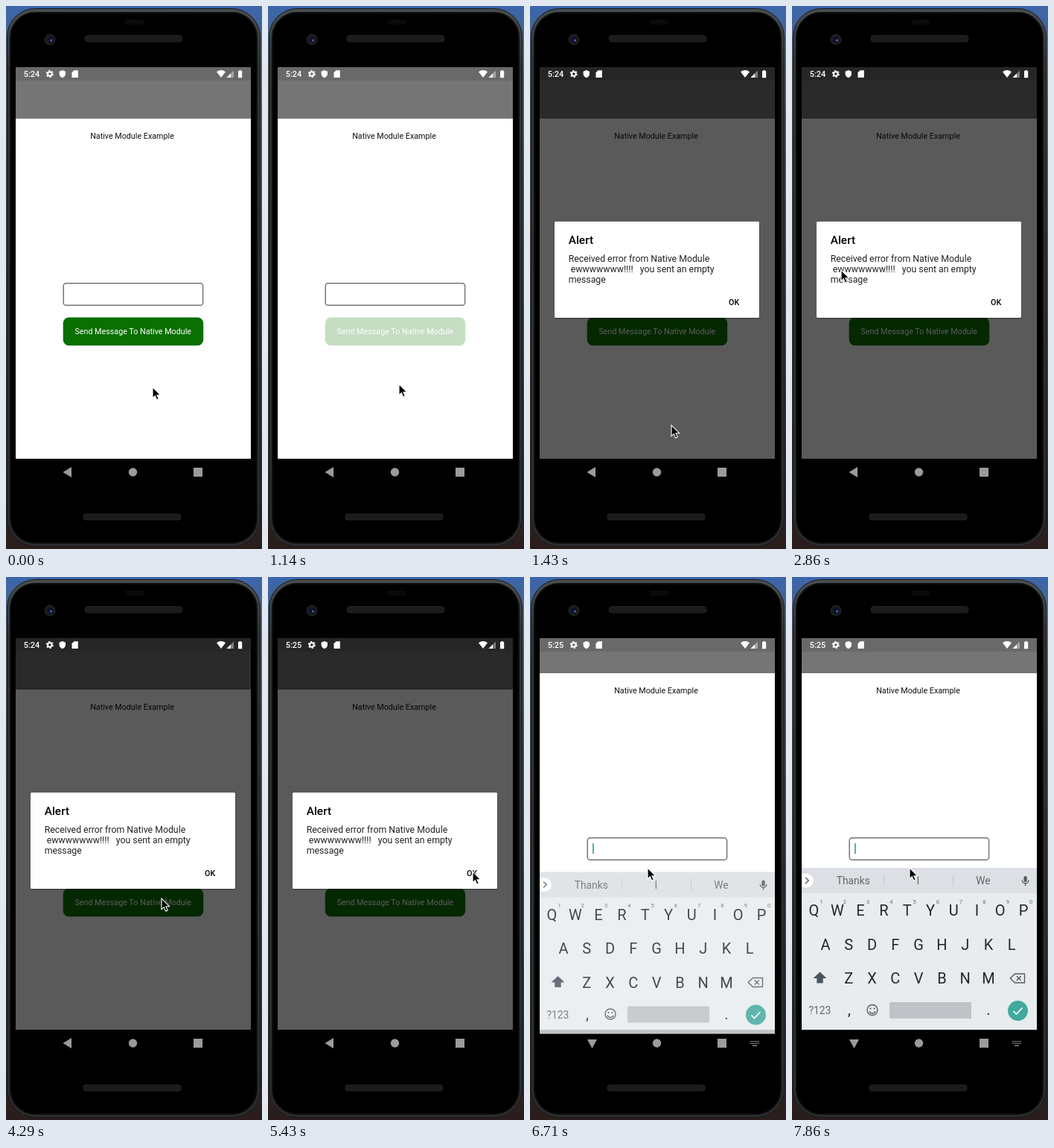
Recreate the animation shown at these times as an HTML page. Size 344 px wide and 728 px high, loop 8000 ms.

```html
<!DOCTYPE html>
<html lang="en">
<head>
<meta charset="utf-8">
<title>Native Module Example</title>
<style>
html, body { margin: 0; width: 100%; height: 100%; overflow: hidden; background: #222; }
svg { display: block; width: 100%; height: 100%; }
text { font-family: Roboto, sans-serif; font-size: 10.76px; white-space: pre; }
.mid { text-anchor: middle; }
.bold { font-weight: 500; }
.body { font-size: 12.3px; fill: #222; }
.word { font-size: 13.8px; fill: #62676c; }
.key { font-size: 20px; fill: #20282f; }
.hint { font-size: 7.5px; fill: #666c72; }
.line { fill: none; stroke: #555b61; stroke-width: 1.4; }
</style>
</head>
<body>
<svg viewBox="0 0 344 728">
  <defs>
    <linearGradient id="desk" x2="0" y2="1">
      <stop offset="0" stop-color="#3c66ac"/>
      <stop offset=".07" stop-color="#4a6288"/>
      <stop offset=".12" stop-color="#55585b"/>
      <stop offset=".7" stop-color="#353637"/>
      <stop offset="1" stop-color="#2a1d1c"/>
    </linearGradient>
    <linearGradient id="rim" x2="0" y2="1">
      <stop offset="0" stop-color="#4a4e4e"/>
      <stop offset=".1" stop-color="#303333"/>
      <stop offset="1" stop-color="#2b2d2d"/>
    </linearGradient>
    <clipPath id="view"><rect x="13" y="82" width="316" height="525"/></clipPath>
  </defs>

  <rect width="344" height="728" fill="url(#desk)"/>
  <rect x="1.5" y="3.5" width="340" height="721" rx="38" fill="url(#rim)" stroke="#161818"/>
  <rect x="6" y="9" width="331" height="711" rx="33" fill="#000" stroke="#0d0e0e" stroke-width="2"/>
  <rect x="160" y="18" width="26" height="7" rx="3" fill="#090909"/>
  <g fill="#1b1b1b" stroke="#2a2a2a" stroke-width=".8">
    <rect x="106" y="39.5" width="131" height="8.5" rx="4"/>
    <rect x="104" y="681" width="131" height="8" rx="3"/>
    <circle cx="59" cy="45" r="7"/>
  </g>
  <circle cx="59.5" cy="45" r="3.6" fill="#0b1229"/>
  <circle cx="60.5" cy="46" r="1.5" fill="#4766b4"/>

  <g clip-path="url(#view)">
    <rect id="page" x="13" y="82" width="316" height="525"/>
    <g id="content">
      <rect x="13" y="60" width="316" height="91" fill="#757575"/>
      <text class="mid" x="169.5" y="178" fill="#111">Native Module Example</text>
      <rect x="77.2" y="371.7" width="187.4" height="29.6" rx="3.6" fill="#fff" stroke="#757575" stroke-width="1.5"/>
      <rect id="caret" x="84.2" y="379" width="1.5" height="14" fill="#1b9a8c"/>
      <g id="button">
        <rect x="76.7" y="417.5" width="188.5" height="37.7" rx="7.7" fill="#0a7000"/>
        <text class="mid" x="170.7" y="440.3" fill="#fff">Send Message To Native Module</text>
      </g>
    </g>
    <rect x="13" y="82" width="316" height="18" fill="#696969"/>
    <rect id="dim" x="13" y="82" width="316" height="525"/>
  </g>

  <g fill="#fff">
    <text id="clock" class="bold" x="23.7" y="95.2" style="font-size:11px" fill="#fff"></text>
    <circle cx="58.8" cy="91" r="2.8" fill="none" stroke="#fff" stroke-width="2"/>
    <circle cx="58.8" cy="91" r="4.2" fill="none" stroke="#fff" stroke-width="1.7" stroke-dasharray="2.2"/>
    <path d="M75.8 86l4.2 1.7v3q0 3.8-4.2 5.6q-4.2-1.8-4.2-5.6v-3z"/>
    <path d="M91.5 86.2h5.3v9.8h-8.3v-6.8z"/>
    <path d="M283 88.2q6-4.2 12 0l-6 7.8z"/>
    <path d="M306 86.5v9.5h-9.5z" opacity=".4"/>
    <path d="M302 90.5v5.5h-5.5z"/>
    <path d="M312 87h1.5v-1h2.2v1h1.5v9.2h-5.2z"/>
  </g>

  <g fill="#9b9b9b">
    <path id="back"/>
    <circle cx="170.5" cy="625" r="5.7"/>
    <rect x="252" y="619" width="12" height="12"/>
    <g id="switcher" fill="none" stroke="#9b9b9b" stroke-width="1.3">
      <path d="M296 622.7h12M296 625.4h12" stroke-dasharray="1.4 .7"/>
      <path d="M299 628.3h6"/>
    </g>
  </g>

  <g id="dialog">
    <rect x="33" y="290" width="275.5" height="129.5" rx="2" opacity=".3"/>
    <rect x="33" y="289" width="275" height="129" rx="1.5" fill="#fff"/>
    <text class="bold" x="51.7" y="319" style="font-size:15.4px">Alert</text>
    <text class="body" x="51.7" y="342.6">Received error from Native Module</text>
    <text class="body" x="51.7" y="357" xml:space="preserve"> ewwwwwww!!!!   you sent an empty</text>
    <text class="body" x="51.7" y="371.4">message</text>
    <text class="bold" x="267" y="400.7">OK</text>
  </g>

  <g id="keyboard">
    <rect x="13" y="390" width="316" height="217" fill="#e8ecef"/>
    <rect x="13" y="390" width="316" height="34" fill="#dcdfe3"/>
    <path d="M13 398.3q3-1 7-.3a9 9 0 0 1 0 18q-4 .7-7-.3z" fill="#fff"/>
    <path d="M18 403l4.2 4-4.2 4" class="line"/>
    <path d="M123.5 399v16M216.5 399v16" stroke="#c3c7cb"/>
    <rect x="311.4" y="401" width="4.4" height="8" rx="2.2" fill="#555b61"/>
    <path d="M309.3 406.5a4.3 4.3 0 0 0 8.6 0M313.6 411v3" class="line"/>
    <path d="M37.5 529.5l9 8.5h-4.8v6.5h-8.4v-6.5h-4.8z" fill="#4b5560"/>
    <path d="M299.5 532h13v12h-13l-6.3-6z" class="line"/>
    <path d="M301.8 535l6 6m0-6l-6 6" class="line"/>
    <circle cx="108" cy="580.5" r="7" class="line"/>
    <path d="M104 582.3a4.3 4.3 0 0 0 8 0" class="line"/>
    <circle cx="105.5" cy="578.5" r="1.1" fill="#555b61"/>
    <circle cx="110.5" cy="578.5" r="1.1" fill="#555b61"/>
    <rect x="131" y="570" width="110" height="22" rx="1.5" fill="#bfc3c7"/>
    <circle cx="303.5" cy="581.5" r="13.5" fill="#42a99d"/>
    <path d="M297.5 582l4 4 8-8.5" fill="none" stroke="#fff" stroke-width="1.6"/>
  </g>

  <path id="pointer" d="M0 0V14.6L3.3 11.6 5.6 17 8.2 15.9 5.9 10.7H10.6Z" stroke="#fff" stroke-width="1.1"/>
</svg>
<script>
const LOOP = 8000, STEP = 1000 / 7;
const $ = id => document.getElementById(id);
const set = (id, attrs) => {
  for (const name in attrs) $(id).setAttribute(name, attrs[name]);
};
const show = (id, on) => set(id, { display: on ? "inline" : "none" });

function label(text, x, y, kind) {
  const el = document.createElementNS("http://www.w3.org/2000/svg", "text");
  el.setAttribute("class", "mid " + kind);
  el.setAttribute("x", x);
  el.setAttribute("y", y);
  el.textContent = text;
  $("keyboard").append(el);
}

const PITCH = 31.28;
[["QWERTYUIOP", 29.5, 454.3], ["ASDFGHJKL", 45, 499.8], ["ZXCVBNM", 76.3, 545]]
  .forEach(([row, x, y], r) => [...row].forEach((c, i) => {
    label(c, x + i * PITCH, y, "key");
    if (!r) label((i + 1) % 10, x + 10 + i * PITCH, 437.8, "hint");
  }));
label("Thanks", 82.3, 412, "word");
label("I", 169.5, 412, "word");
label("We", 257, 412, "word");
label("?123", 37.5, 586, "word");
label(",", 77, 587, "key");
label(".", 264, 587, "key");

// Pointer stops: step, x, y
const path = [
  [0, 197, 511], [2, 180, 480], [5, 150, 438], [7, 150, 438], [8, 176, 507],
  [10, 190, 562], [15, 190, 562], [17, 168, 480], [19, 80, 366], [20, 66, 354],
  [23, 214, 354], [24, 190, 357], [26, 80, 359], [28, 210, 356], [29, 298, 372],
  [30, 209, 431], [31, 215, 428], [33, 298, 404], [35, 277, 393], [38, 275, 395],
  [39, 278, 425], [40, 279, 456], [42, 185, 405], [43, 158, 390], [56, 158, 390]
];

function track(stops, k) {
  const i = Math.max(1, stops.findIndex(s => s[0] >= k));
  const [a, b] = [stops[i - 1], stops[i]];
  const p = (k - a[0]) / (b[0] - a[0]);
  return [1, 2].map(n => a[n] + (b[n] - a[n]) * p);
}

function render(t) {
  const k = Math.floor((t + 5) / STEP);
  const alert = k < 9 || k >= 40 ? 0 : k === 9 ? 0.5 : 1;
  const typing = k >= 46;
  const pressed = k === 7 || k === 8;

  set("page", { fill: k >= 10 && k < 45 ? "#fafafa" : "#fff" });
  set("content", { transform: `translate(0 ${typing ? -22 : 0})` });
  set("button", { opacity: pressed ? 0.23 : k === 9 ? 0.6 : 1 });
  show("button", !typing);
  show("caret", k >= 45);
  set("dim", { opacity: alert * 0.64 });
  set("dialog", { opacity: alert });
  $("clock").textContent = k < 34 ? "5:24" : "5:25";

  set("back", { d: typing ? "M77 620h13l-6.5 12z" : "M76.5 625l11.5-7v14z" });
  show("switcher", typing);
  show("keyboard", typing);
  const [drop, alpha] = k === 46 ? [15, 0.45] : k === 47 ? [5.5, 0.84] : [0, 1];
  set("keyboard", { transform: `translate(0 ${drop})`, opacity: alpha });

  set("pointer", { transform: `translate(${track(path, k)})` });
}

const start = performance.now();
function tick(now) {
  render(Math.max(0, now - start) % LOOP);
  requestAnimationFrame(tick);
}
render(0);
requestAnimationFrame(tick);
</script>
</body>
</html>
```
